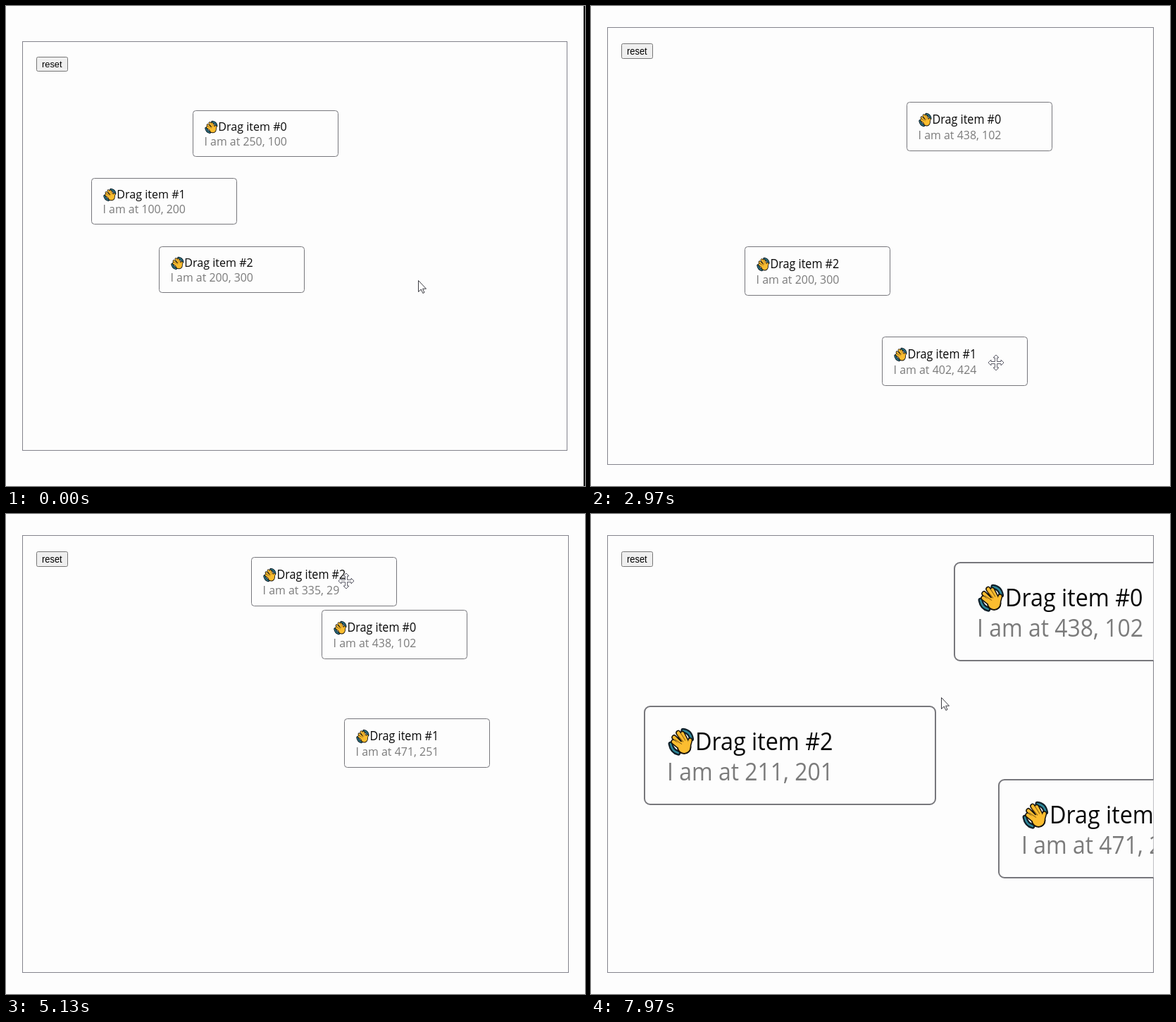
Recreate the animation shown at these times as an HTML page. Size 822 by 681 pixels, loop 7.99 s.

```html
<!DOCTYPE html>
<html lang="en">
<head>
<meta charset="utf-8">
<title>Drag items</title>
<style>
  html, body { margin: 0; width: 100%; height: 100%; overflow: hidden; background: #fdfdfd; }
  svg { display: block; width: 822px; height: 681px; }
  .line { fill: none; stroke: #83838c; }
  .card rect { fill: #fdfdfd; stroke: #77777c; }
  .card text { font: 16.7px "Open Sans", "Noto Sans", sans-serif; fill: #080808; white-space: pre; }
  .card .at { font-size: 16.5px; fill: #7b7b7b; }
  #btn rect { fill: #efefef; stroke: #767676; }
  #btn text { font: 13.33px "Liberation Sans", Arial, sans-serif; fill: #000; }
  .pointer { fill: #fff; stroke: #3c3c42; }
  .mover { fill: #fff; stroke: #5c5c68; }
</style>
</head>
<body>
<svg viewBox="0 0 822 681">
  <defs>
    <clipPath id="inside"><rect id="clip"/></clipPath>
    <path id="waves" d="M21 4Q31 5 33 15M3 22Q5 32 14 34"/>
    <path id="fingers" d="M19 28L7 19M20 24L8 13M23 20L14 7M26 19L20 8M28 27L31 17"/>
    <g id="hand" fill="none" stroke-linecap="round" stroke-linejoin="round">
      <use href="#waves" stroke="#10202a" stroke-width="7"/>
      <use href="#waves" stroke="#2f8a9c" stroke-width="2.4"/>
      <g stroke="#15120c" fill="#15120c">
        <use href="#fingers" stroke-width="7.4"/>
        <ellipse cx="22.500" cy="26" rx="9" ry="8.500" stroke-width="3"/>
      </g>
      <g stroke="#fbbd30" fill="#fbbd30">
        <use href="#fingers" stroke-width="4.4"/>
        <ellipse cx="22.500" cy="26" rx="8" ry="7.500"/>
      </g>
      <path d="M19 22L9 16M21 19L13 10M24 17L18 8" stroke="#8a6016"/>
    </g>
  </defs>
  <rect width="822" height="681" fill="#fdfdfd"/>
  <path id="edge" d="M821 0V681" stroke="#000" stroke-width="2"/>
  <rect id="frame" class="line"/>
  <g id="btn">
    <rect x="43.5" width="44" rx="2"/>
    <text>reset</text>
  </g>
  <g id="world" clip-path="url(#inside)"></g>
  <path id="arrow" class="pointer" d="M.5.5V16.500L4.300 13 6.800 18.500 9 17.500 6.600 12.200H11.500Z"/>
  <path id="move" class="mover" d="M0-11 4-7H1.500V-1.500H7V-4L11 0 7 4V1.500H1.500V7H4L0 11-4 7H-1.500V1.500H-7V4L-11 0-7-4V-1.500H-1.500V-7H-4Z"/>
</svg>
<script>
const LOOP = 7990;
const LAG = 30;                          // cards trail the pointer
const ZOOM = { at: 7000, time: 290, x: 381.4, y: 204.5 };
const $ = id => document.getElementById(id);
const set = (el, attrs) => { for (const k in attrs) el.setAttribute(k, attrs[k]); };

// The view starts unstretched, then snaps taller.
const flat = { x: 24.6, y: 51.6, sx: .964, sy: .966, top: 50.5, wide: 773, high: 580, btn: 72.5 };
const tall = { x: 24.75, y: 31.3, sx: .9675, sy: 1.033, top: 30.5, wide: 775, high: 620, btn: 53.5 };
const CARD = { w: 213.2, h: 67.2 };

// Each drag: where the card is held, and its way as [time, x, y]
const cards = [
  { hold: [123, 45], drop: 1780,
    way: [[840, 250, 100], [1640, 436, 102], [1720, 438, 102]] },
  { hold: [167.5, 24], drop: 4150,
    way: [[2200, 100, 200], [2650, 330, 300], [2940, 402, 424], [3040, 376, 455],
      [3240, 466, 310], [3880, 470, 250], [4000, 471, 251]] },
  { hold: [141, 31], drop: 6680,
    way: [[4560, 200, 300], [4960, 421, 115], [5100, 335, 29], [5720, 240, 421],
      [5970, 98, 218], [6380, 211, 201]] }
];

const onStage = ([t, x, y], [hx, hy]) =>
  [t, tall.x + x * tall.sx + hx, tall.y + y * tall.sy + hy];

// The pointer reaches each card, carries it, then rests until the drop.
const pointer = [
  [0, 585, 389], [60, 585, 389],
  ...cards.flatMap(({ way, hold, drop }) => {
    const [t, ...first] = way[0], last = way[way.length - 1].slice(1);
    return [[t - 80, ...first], ...way, [drop, ...last]].map(p => onStage(p, hold));
  }),
  [6740, 381, 204], [7710, 381, 204], [7960, 497, 260]
];

// Tangent that never overshoots a key
function tangent(keys, i, k) {
  if (i === 0 || i === keys.length - 1) return 0;
  const slope = j => (keys[j + 1][k] - keys[j][k]) / (keys[j + 1][0] - keys[j][0]);
  const a = slope(i - 1), b = slope(i);
  return a * b <= 0 ? 0 : 2 * a * b / (a + b);
}

function along(keys, t) {
  const end = keys.length - 1;
  t = Math.min(keys[end][0], Math.max(keys[0][0], t));
  let i = 0;
  while (i < end - 1 && t >= keys[i + 1][0]) i++;
  const p = keys[i], q = keys[i + 1], d = q[0] - p[0], u = (t - p[0]) / d, v = 1 - u;
  return [1, 2].map(k => v * v * (1 + 2 * u) * p[k] + u * u * (1 + 2 * v) * q[k]
    + d * u * v * (v * tangent(keys, i, k) - u * tangent(keys, i + 1, k)));
}

cards.forEach((c, i) => {
  c.el = document.createElementNS("http://www.w3.org/2000/svg", "g");
  c.el.setAttribute("class", "card");
  c.el.innerHTML = `<rect rx="4"/><g><use href="#hand" transform="translate(17.6 14.6) scale(.51)"/>
    <text x="37.2" y="29.900">Drag item #${i}</text><text class="at" x="16.6" y="50.900"></text></g>`;
  $("world").append(c.el);
  [c.box, c.body] = c.el.children;
  c.label = c.el.querySelector(".at");
});

function applyLayout(v) {
  const stage = { x: 23.5, y: v.top, width: v.wide, height: v.high };
  set($("frame"), stage);
  set($("clip"), stage);
  const [box, text] = $("btn").children;
  set(box, { y: v.btn, height: Math.round(20.5 * v.sy) });
  set(text, { transform: `translate(51 ${v.btn + 15 * v.sy}) scale(${v.sx} ${v.sy})` });
  $("edge").style.display = v === flat ? "" : "none";
  for (const c of cards) set(c.body, { transform: `scale(${v.sx} ${v.sy})` });
}

function zoomAt(t) {
  const u = Math.min(1, Math.max(0, (t - ZOOM.at) / ZOOM.time));
  return 2 ** (u < .5 ? 4 * u ** 3 : 1 - 4 * (1 - u) ** 3);
}

let layout;
function draw(t) {
  const v = t < 20 ? flat : tall;
  if (v !== layout) applyLayout(layout = v);
  const [px, py] = along(pointer, t).map(Math.round);
  const z = zoomAt(t);
  // Outlines of width z keep to whole pixels.
  const snap = (pos, mid) => Math.round(mid + (pos - mid) * z - z / 2) + z / 2;
  const width = Math.round(CARD.w * v.sx * z), height = Math.round(CARD.h * v.sy * z);

  let over = false;
  for (const c of cards) {
    const [x, y] = along(c.way, t - LAG).map(Math.round);
    const left = snap(v.x + x * v.sx, ZOOM.x), top = snap(v.y + y * v.sy, ZOOM.y);
    set(c.el, { transform: `translate(${left} ${top}) scale(${z})` });
    set(c.box, { width: width / z, height: height / z });
    c.label.textContent = `I am at ${x}, ${y}`;
    const held = t > c.way[0][0] && t < c.drop - LAG;
    over = over || held || px > left && px < left + width && py > top && py < top + height;
  }
  $("arrow").style.display = over ? "none" : "";
  $("move").style.display = over ? "" : "none";
  set(over ? $("move") : $("arrow"), { transform: `translate(${px} ${py})` });
}

const start = performance.now();
function tick() {
  draw((performance.now() - start) % LOOP);
  requestAnimationFrame(tick);
}
tick();
</script>
</body>
</html>
```
